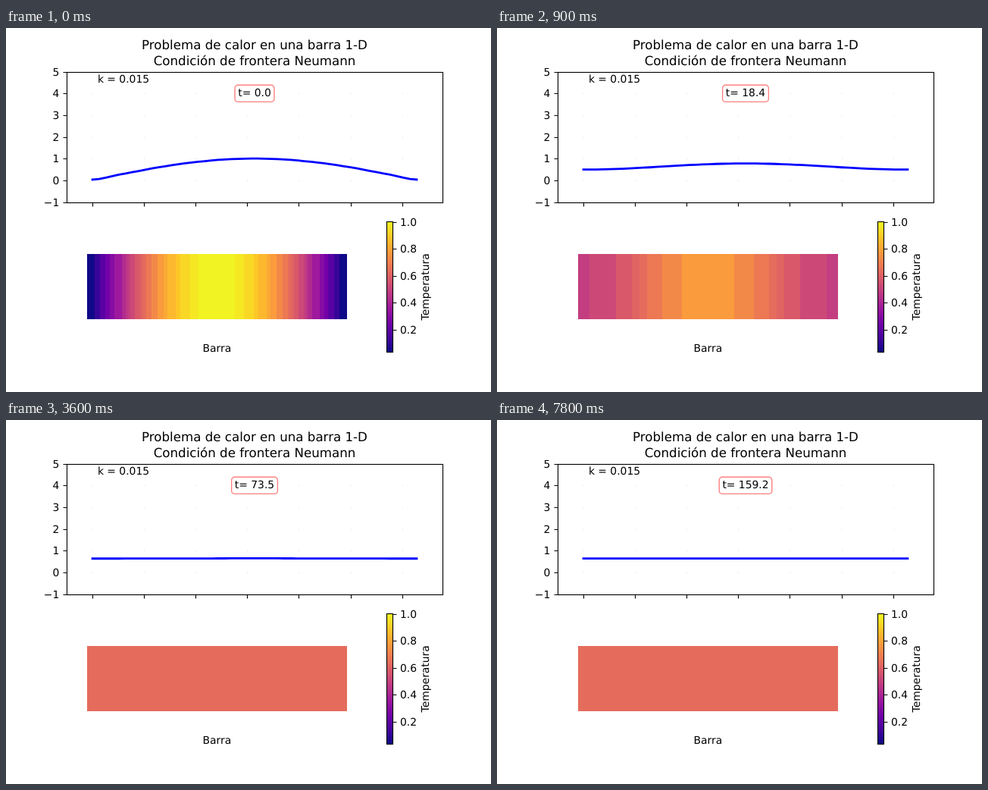
These frames come from a looping animation (640x480 px, 8 s). An HTML page:

```html
<!DOCTYPE html>
<html lang="es">
<head>
<meta charset="utf-8">
<title>Problema de calor</title>
<style>
  html, body { margin: 0; width: 100%; height: 100%; overflow: hidden; background: #fff; }
  svg { display: block; width: 640px; height: 480px; }
  text { font: 13.89px "DejaVu Sans", sans-serif; text-rendering: geometricPrecision; fill: #000; }
  .title { font-size: 16.67px; }
  .mid { text-anchor: middle; }
  .end { text-anchor: end; }
  .axis { fill: none; stroke: #000; stroke-width: 1.11; }
</style>
</head>
<body>
<svg viewBox="0 0 640 480">
  <defs><linearGradient id="plasma" x1="0" y1="1" x2="0" y2="0"></linearGradient></defs>
  <text class="title mid" x="328" y="28">Problema de calor en una barra 1-D</text>
  <text class="title mid" x="328" y="49.2">Condición de frontera Neumann</text>
  <g id="dots" fill="#dcdcdc"></g>
  <path id="curve" fill="none" stroke="#00f" stroke-width="2.78" stroke-linecap="square" stroke-linejoin="round"/>
  <rect class="axis" x="80.5" y="58.5" width="496" height="172"/>
  <text x="120.9" y="72">k = 0.015</text>
  <rect id="box" y="75.2" height="22.2" rx="4.2" fill="#fff" stroke="#ff8080" stroke-width="1.39"/>
  <text id="clock" class="mid" x="328" y="90.4"></text>
  <g id="bar" shape-rendering="crispEdges"></g>
  <text class="mid" x="278.4" y="427">Barra</text>
  <rect class="axis" x="502.5" y="255.5" width="8" height="172" style="fill:url(#plasma)"/>
  <path id="ticks" class="axis"/>
  <g id="labels"></g>
  <text class="mid" transform="translate(557.7 341.3) rotate(-90)">Temperatura</text>
</svg>
<script>
const $ = id => document.getElementById(id);
const STEP = 300, LOOP = 8000, K = 0.015, TERMS = 9, POINTS = 50;
const LOW = 0.0335, HIGH = 1.0016;
const STOPS = ['0d0887', '46039f', '7201a8', '9c179e', 'bd3786',
               'd8576b', 'ed7953', 'fb9f3a', 'fdca26', 'f0f921'];
// Contour levels that separate the colour bands of the bar
const LEVELS = [0, .075, .15, .225, .275, .325, .4, .45, .475, .5, .55, .6, .625,
                .65, .7, .75, .8, .825, .875, .9, .95, .975, 1.0016];

const px = x => 80 + (x + 0.25) * 496 / (Math.PI + 0.5);
const py = u => 57.6 + (5 - u) * 28.651;
const barY = v => 427.2 - (v - LOW) / (HIGH - LOW) * 171.9;
const snap = v => Math.floor(v + 0.5) + 0.5;

// Fourier solution for sin(x) on [0, pi] with insulated ends
function heat(x, t) {
  let u = 2 / Math.PI;
  for (let n = 1; n <= TERMS; n++) {
    u -= 4 / Math.PI * Math.cos(2 * n * x) * Math.exp(-4 * n * n * K * t) / (4 * n * n - 1);
  }
  return u;
}

function plasma(v) {
  const s = Math.min(1, Math.max(0, (v - LOW) / (HIGH - LOW))) * 9;
  const i = Math.min(8, Math.floor(s)), f = s - i;
  const part = (c, j) => parseInt(c.substr(j, 2), 16);
  const mix = j => Math.round(part(STOPS[i], j) * (1 - f) + part(STOPS[i + 1], j) * f);
  return `rgb(${mix(0)},${mix(2)},${mix(4)})`;
}

const bands = LEVELS.slice(1).map((hi, i) => plasma((LEVELS[i] + hi) / 2));

function band(u) {
  let i = 0;
  while (i < bands.length - 1 && u >= LEVELS[i + 1]) i++;
  return i;
}

function buildAxes() {
  let ticks = '', labels = '', dots = '';
  const label = (x, y, s, cls = '') =>
    labels += `<text class="${cls}" x="${x}" y="${y + 5.2}">${s}</text>`;
  for (let v = -1; v <= 5; v++) {
    ticks += `M75.5 ${snap(py(v))}H80.5`;
    label(70.3, py(v), String(v).replace('-', '\u2212'), 'end');
  }
  for (let i = 0; i <= 6; i++) {
    const x = snap(px(i / 2));
    ticks += `M${x} 230.5V235.5`;
    for (let v = 0; v <= 4; v++) {
      dots += `<rect x="${x - 0.5}" y="${snap(py(v)) - 0.5}" width="1" height="1"/>`;
    }
  }
  for (let i = 1; i <= 5; i++) {
    const v = i / 5;
    ticks += `M510.5 ${snap(barY(v))}H515.5`;
    label(520, barY(v), v.toFixed(1));
  }
  $('ticks').setAttribute('d', ticks);
  $('labels').innerHTML = labels;
  $('dots').innerHTML = dots;
  $('plasma').innerHTML = STOPS.map((c, i) =>
    `<stop offset="${i / 9}" stop-color="#${c}"/>`).join('');
}

function drawCurve(t) {
  let d = '';
  for (let i = 0; i < POINTS; i++) {
    const x = i * Math.PI / (POINTS - 1);
    d += `${i ? 'L' : 'M'}${px(x).toFixed(2)} ${py(heat(x, t)).toFixed(2)}`;
  }
  $('curve').setAttribute('d', d);
}

function drawBar(t) {
  const left = 107, right = 450;
  const at = col => band(heat((col + 0.5 - 107.24) / 108.96, t));
  let out = '', from = left;
  for (let col = left + 1; col <= right; col++) {
    if (col < right && at(col) === at(from)) continue;
    out += `<rect x="${from}" y="298" width="${col - from}" height="86" fill="${bands[at(from)]}"/>`;
    from = col;
  }
  $('bar').innerHTML = out;
}

function drawClock(t) {
  const s = t.toFixed(1), w = 51.9 + (s.length - 3) * 8.84;
  $('clock').textContent = 't= ' + s;
  $('box').setAttribute('x', 328 - w / 2);
  $('box').setAttribute('width', w);
}

let shown = -1;
const start = performance.now();

function frame() {
  const n = Math.floor((performance.now() - start) % LOOP / STEP);
  if (n !== shown) {
    const t = n * 300 / 49;
    drawCurve(t);
    drawBar(t);
    drawClock(t);
    shown = n;
  }
  requestAnimationFrame(frame);
}

buildAxes();
frame();
</script>
</body>
</html>
```
